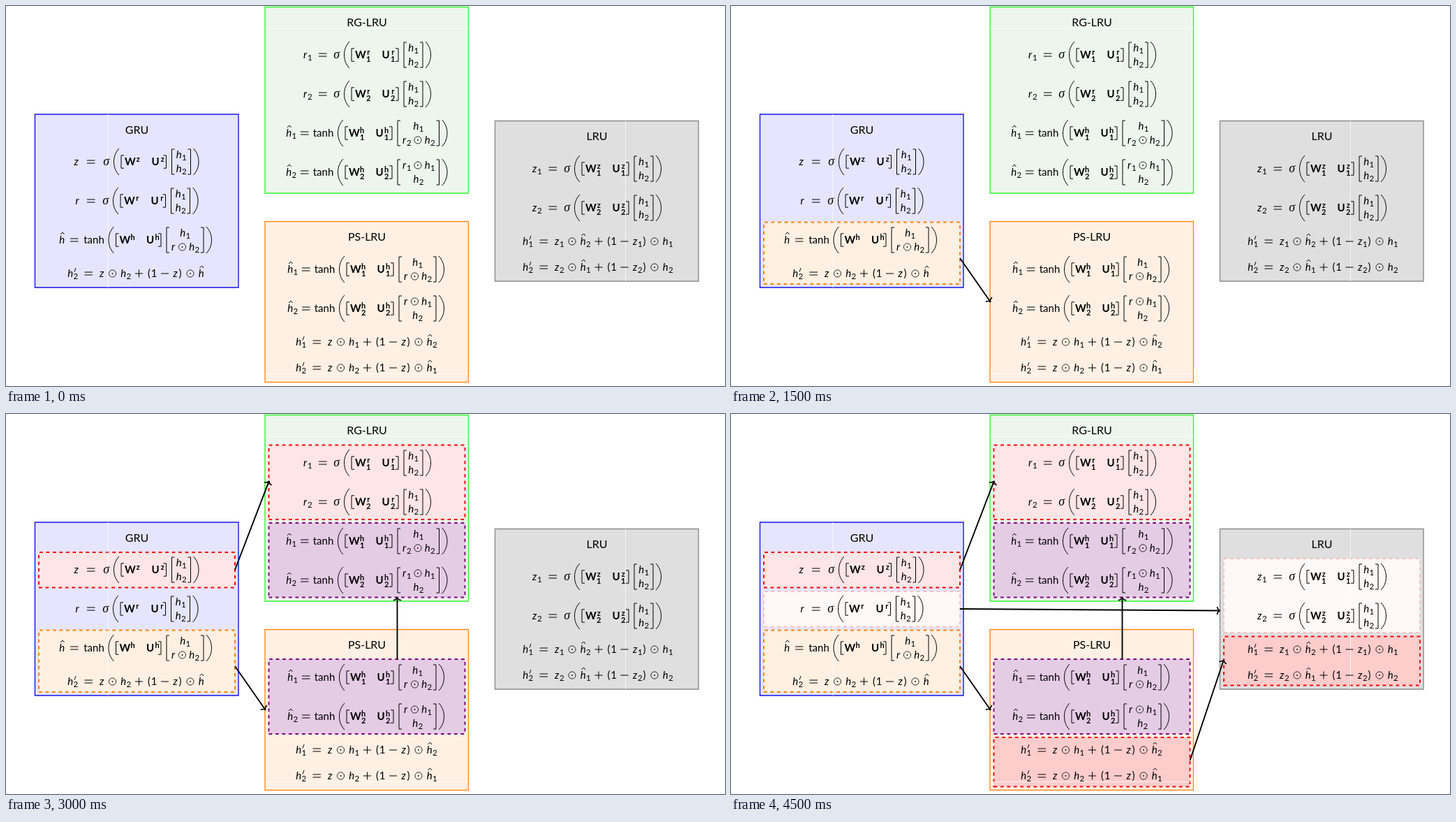
An HTML page that plays this animation: 1030 by 544 pixels, repeating every 6000 ms.

```html
<!DOCTYPE html>
<html lang="en">
<head>
<meta charset="utf-8">
<title>Gated recurrent units</title>
<style>
html, body { margin: 0; width: 100%; height: 100%; overflow: hidden; background: #fff; }
svg { display: block; width: 1030px; height: 544px; }
text { font: 15px Lato, "Open Sans", sans-serif; text-anchor: middle; }
.title { font-size: 16px; }
.var { font-style: italic; }
.sub { font-size: 11.5px; }
.sigma { font: italic 18px "Liberation Serif", serif; }
.bold { font-weight: bold; }
.script { font-weight: bold; font-size: 11px; }
.ink { fill: none; stroke: #000; stroke-width: 1; }
.box { stroke-width: 1.4; }
.mark { stroke-width: 1.9; stroke-dasharray: 4.74; }
.arrow { fill: none; stroke: #000; stroke-width: 1.9; }
.seam { stroke: #fff; opacity: .75; }
</style>
</head>
<body>
<svg id="stage" viewBox="0 0 1030 544"></svg>
<script>
const STEP = 1500, STEPS = 4;
const WIDTH = { h: 8.5, H: 8.5, z: 7.5, r: 7, s: 9.5, t: 30, '(': 6, ')': 6, 1: 8 };
const OP = 11, SUB = 6.5;

const label = (x, y, str, cls = '') => `<text x="${x}" y="${y}" class="${cls}">${str}</text>`;
const ink = d => `<path class="ink" d="${d}"/>`;
const at = (x, y, body) => `<g transform="translate(${x} ${y})">${body}</g>`;

// Typesets a formula around y = 0: H is h with a hat, s sigma, t tanh, o the
// elementwise product, _n a subscript and ' a prime.
function formula(src, relGap = 9.5, opGap = 6) {
  let x = 0, svg = '';
  for (let i = 0; i < src.length; i++) {
    const c = src[i];
    if (c === '_') {
      svg += label(x + SUB / 2, 7.5, src[++i], 'sub');
      x += SUB;
    } else if (c === "'") {
      svg += ink(`M${x + 3.5} -8l-2 5.5`);
    } else if (c === '=') {
      x += relGap;
      svg += ink(`M${x} -2h11.5m0 4h-11.5`);
      x += 11.5 + relGap;
    } else if ('+-o'.includes(c)) {
      x += opGap;
      const mid = x + OP / 2;
      if (c === 'o') {
        svg += `<circle class="ink" cx="${mid}" cy="0" r="5.1" style="stroke-width:.8"/><circle cx="${mid}" cy="0" r=".9"/>`;
      } else {
        svg += ink(`M${x} 0h${OP}` + (c === '+' ? `M${mid} -5.5v11` : ''));
      }
      x += OP + opGap;
    } else {
      const w = WIDTH[c], mid = x + w / 2;
      if (c === 's') svg += label(mid, 5, 'σ', 'sigma');
      else if (c === 't') svg += label(mid, 5, 'tanh');
      else svg += label(mid, 5, c.toLowerCase(), /[hzr]/i.test(c) ? 'var' : '');
      if (c === 'H') svg += ink(`M${x + 2} -8l3 -3l2.5 3`);
      x += w;
    }
  }
  return { svg, width: x };
}

const flat = (x, y, src) => at(x, y, formula(src).svg);

function brackets(left, right, half) {
  return ink(`M${left + 4} ${-half}h-4v${2 * half}h4M${right - 4} ${-half}h4v${2 * half}h-4`);
}

function weight(mid, name, scriptMid, sup, sub) {
  return label(mid, 5, name, 'bold') + label(scriptMid, -.5, sup, 'script') +
    (sub ? label(scriptMid, 9.5, sub, 'script') : '');
}

// left-hand side, then ([W U][top; bottom])
function row(x, y, lhs, gap, sup, sub, top, bottom) {
  const head = formula(lhs, gap);
  const a = formula(top, 0, 4), b = formula(bottom, 0, 4);
  const end = sub ? 79.5 : 77;
  const left = end + 8, right = left + Math.max(a.width, b.width) + 12;
  const mid = (left + right) / 2;
  const body =
    ink('M9.5 -19c-10 10 -10 28 0 38') +
    brackets(12.5, end, 9.2) +
    weight(25.5, 'W', 36.7, sup, sub) + weight(61.5, 'U', 71.7, sup, sub) +
    brackets(left, right, 18) +
    at(mid - a.width / 2, -10, a.svg) + at(mid - b.width / 2, 10, b.svg) +
    ink(`M${right + 4} -19c10 10 10 28 0 38`);
  return at(x, y, head.svg) + at(x + head.width + 4, y, body);
}

function rect(cls, x, y, right, bottom, fill, stroke) {
  return `<path class="${cls}" fill="${fill}" stroke="${stroke}" d="M${x} ${bottom}H${right}V${y}H${x}Z"/>`;
}

function arrow(step, x1, y1, x2, y2) {
  const angle = Math.atan2(y2 - y1, x2 - x1) * 180 / Math.PI;
  const len = Math.hypot(x2 - x1, y2 - y1);
  return `<g class="arrow" data-step="${step}" transform="translate(${x2} ${y2}) rotate(${angle})">
    <path d="M${-len} 0H-1"/><path stroke-width="1.6" stroke-linecap="round" stroke-linejoin="round"
    d="M-4.5 -5C-4 -2.5 -1.5 -.4 -.6 0C-1.5 .4 -4 2.5 -4.5 5"/></g>`;
}

const mark = (step, x, y, bottom, fill, stroke) =>
  `<g data-step="${step}">${rect('mark', x, y, x + 281, bottom, fill, stroke)}</g>`;
const seam = d => `<path class="seam" d="${d}"/>`;
const title = (x, y, str) => label(x, y, str, 'title');

const boxes =
  rect('box', 41.5, 155, 333, 403, '#e5e5ff', '#1414f0') +
  rect('box', 371, 1.5, 662.5, 268, '#ecf6ec', '#33f533') +
  rect('box', 371, 308.5, 662.5, 538.5, '#fff0e3', '#ff8c1a') +
  rect('box', 700.5, 164.5, 992, 394, '#dfdfdf', '#8c8c8c');

const marks =
  mark(1, 47, 309.5, 398, '#fff0e2', '#ff8000') +
  mark(2, 47, 198, 248.5, '#ffe5e5', '#f00') +
  mark(2, 376.5, 44.5, 151, '#ffe5e5', '#f00') +
  mark(2, 376.5, 156, 262.5, '#e4cce4', '#800080') +
  mark(2, 376.5, 351, 458, '#e4cce4', '#800080') +
  mark(3, 47, 254, 304.5, '#fff8f8', '#ffbfbf') +
  mark(3, 706, 207, 313, '#fff8f8', '#ffbfbf') +
  mark(3, 376.5, 463, 533.5, '#fcc', '#f00') +
  mark(3, 706, 318.5, 388.5, '#fcc', '#f00');

const seams = seam('M146 155V403') + seam('M371 32H662.5') +
  seam('M371 526.5H662.5') + seam('M887.5 164.5V394');

const formulas =
  title(187.5, 182.5, 'GRU') +
  row(97, 223, 'z=s', 11.5, 'z', '', 'h_1', 'h_2') +
  row(98.5, 279, 'r=s', 10.5, 'r', '', 'h_1', 'h_2') +
  row(76, 335, 'H=t', 7.5, 'h', '', 'h_1', 'roh_2') +
  flat(88, 383, "h'_2=zoh_2+(1-z)oH") +

  title(517, 29, 'RG-LRU') +
  row(425, 70, 'r_1=s', 9.5, 'r', 1, 'h_1', 'h_2') +
  row(425, 126, 'r_2=s', 9.5, 'r', 2, 'h_1', 'h_2') +
  row(401, 182, 'H_1=t', 6, 'h', 1, 'h_1', 'r_2oh_2') +
  row(401, 238, 'H_2=t', 6, 'h', 2, 'r_1oh_1', 'h_2') +

  title(517, 336, 'PS-LRU') +
  row(403, 377, 'H_1=t', 6, 'h', 1, 'h_1', 'roh_2') +
  row(403, 433, 'H_2=t', 6, 'h', 2, 'roh_1', 'h_2') +
  flat(415, 481, "h'_1=zoh_1+(1-z)oH_2") +
  flat(415, 518, "h'_2=zoh_2+(1-z)oH_1") +

  title(846.5, 191.5, 'LRU') +
  row(753.5, 233, 'z_1=s', 10, 'z', 1, 'h_1', 'h_2') +
  row(753.5, 289, 'z_2=s', 10, 'z', 2, 'h_1', 'h_2') +
  flat(740, 337, "h'_1=z_1oH_2+(1-z_1)oh_1") +
  flat(740, 374, "h'_2=z_2oH_1+(1-z_2)oh_2");

const arrows =
  arrow(1, 328, 361, 372, 424) +
  arrow(2, 328, 223, 377, 95.5) +
  arrow(2, 560.5, 351, 560.5, 262) +
  arrow(3, 328, 279, 701, 281.5) +
  arrow(3, 657.5, 496, 706, 351.5);

const stage = document.getElementById('stage');
stage.innerHTML = boxes + marks + seams + formulas + arrows;
const staged = [...stage.querySelectorAll('[data-step]')];

function draw() {
  const step = Math.floor(performance.now() / STEP) % STEPS;
  for (const el of staged) el.style.display = el.dataset.step <= step ? '' : 'none';
  requestAnimationFrame(draw);
}
draw();
</script>
</body>
</html>
```
